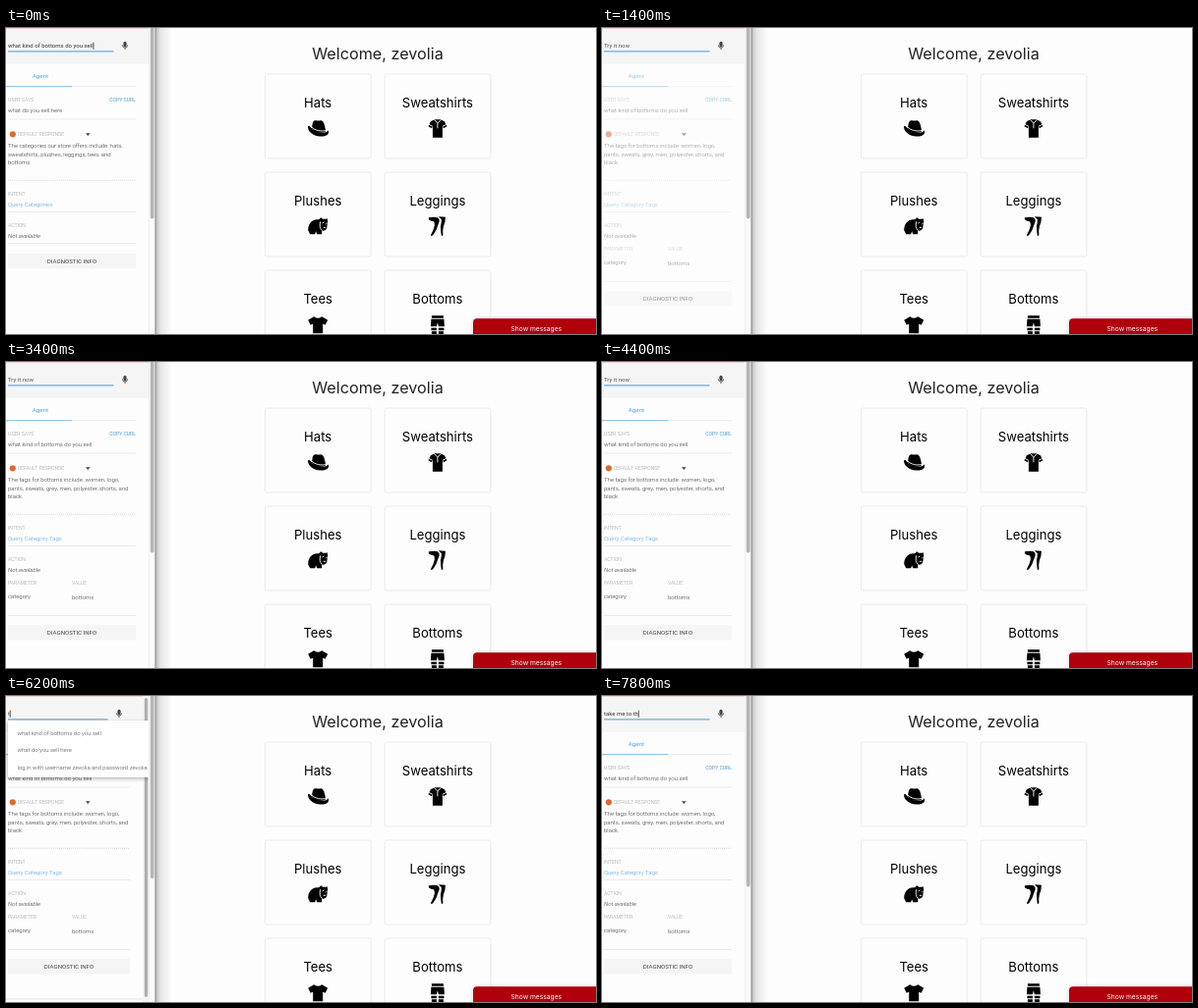
Write an HTML page that moves like this. It is 600 by 312 pixels and loops after 8 s.

```html
<!DOCTYPE html>
<html lang="en">
<head>
<meta charset="utf-8">
<title>Shop assistant</title>
<style>
  html, body { margin: 0; width: 100%; height: 100%; overflow: hidden; background: #fdfdfe; }
  svg { display: block; width: 100%; height: 100%; }
  text { white-space: pre; }
  #shop { font-family: Inter, sans-serif; text-anchor: middle; }
  #panel { font: 6px Roboto, sans-serif; fill: #555; }
  #panel .label { font-size: 5.15px; font-weight: 300; fill: #999; }
  #panel .body { font-weight: 300; fill: #333; }
  #panel .link { fill: #4a9fdc; }
</style>
</head>
<body>
<svg viewBox="0 0 600 312">
  <defs>
    <linearGradient id="edge">
      <stop offset="0" stop-color="#bbb"/>
      <stop offset=".3" stop-color="#e6e6e7"/>
      <stop offset="1" stop-color="#fdfdfe"/>
    </linearGradient>
    <filter id="blur" x="-20%" y="-40%" width="140%" height="180%"><feGaussianBlur stdDeviation="2"/></filter>
  </defs>
  <rect width="600" height="312" fill="#fdfdfe"/>
  <g id="shop"></g>
  <g id="panel"></g>
  <rect x="145" width="7" height="312" fill="#fafafa"/>
  <path d="M145.3 0V312" stroke="#e9e9e9" stroke-width=".6"/>
  <rect id="thumb" x="146.8" y="-4" width="3.7" rx="1.8" fill="#b4b4b4"/>
  <rect x="152" width="17" height="312" fill="url(#edge)"/>
  <path d="M152 0V312" stroke="#858585"/>
</svg>
<script>
const DURATION = 8000, STEP = 200;
const NAME = 'zevolia';
const QUESTION = 'what kind of bottoms do you sell';
const shop = document.getElementById('shop');
const panel = document.getElementById('panel');
const thumb = document.getElementById('thumb');

const text = (x, y, s, attrs = '') => `<text x="${x}" y="${y}" ${attrs}>${s}</text>`;
const box = (x, y, w, h, fill, attrs = '') =>
  `<rect x="${x}" y="${y}" width="${w}" height="${h}" fill="${fill}" ${attrs}/>`;
const line = (x1, x2, y, color = '#e2e2e2', attrs = '') =>
  `<path d="M${x1} ${y}H${x2}" stroke="${color}" stroke-width=".7" ${attrs}/>`;
const shape = d => `<path d="${d}"/>`;
const cut = d => `<path d="${d}" fill="none" stroke="#fdfdfe" stroke-width=".9"/>`;

// Icons are centred on the origin, about 20 units wide.
const icons = {
  Hats: shape('M-10 -2C-11 2 -6 8 3 8.300C9 8.500 12 6 10.500 2C9 5 2 6 -4 2.500C-7 0 -8 -3 -10 -2Z'
    + 'M-6 1C-6 -5 -5 -9 -2 -8Q1 -7.500 3 -8C6 -8 7 -3 8 3C4 6 -3 4 -6 1Z')
    + cut('M-6.500 -1.500C-3 2.500 4 3.500 8.500 2'),
  Sweatshirts: shape('M-3 -9L-7 -7 -9.500 -2 -6 0 -5 -2V9.500H5V-2L6 0 9.500 -2 7 -7 3 -9Z')
    + cut('M-3.500 -9L0 -5 3.500 -9M0 -5V0M-9 -4L-5 -2M9 -4L5 -2'),
  Plushes: shape('M-10 4C-10 -4 -5 -8 1 -7L3 -9 5 -7.500H8L9.500 -8 10 -5 9 2C8 4 6 5 4 4V8H-1L-2 5 -3 8H-8Z')
    + cut('M2.500 -5Q1 1 4 4M4.500 -3L6 -4.500M8 -2L9.500 -3.500M5.500 1H8'),
  Leggings: shape('M-9 -9Q-3 -10 0 -9Q3 -7 1 -3Q-1 4 -4 8L-6 10 -7 9Q-4 4 -3 -1Q-3 -4 -4 -5Q-7 -5 -9 -7Z'
    + 'M1 -10L8 -9.500Q8 -4 6 0Q5 4 5.500 9L4 10Q3 5 3 0Q4 -4 4 -7Z'),
  Tees: shape('M-4 -8Q0 -5 4 -8L10 -4.500 7.500 .5 5 -.5V9H-5V-.5L-7.500 .5 -10 -4.500Z'),
  Bottoms: shape('M-6 -9H6V-6.500H-6ZM-6.500 -5.500H6.500L7 2H1L0 -2 -1 2H-7Z'
    + 'M-6.500 3.500H-1V6H-6.500ZM1 3.500H6.500V6H1ZM-6 7H-1V10H-6ZM1 7H6V10H1Z')
};

function drawShop() {
  const cards = Object.entries(icons).map(([title, icon], i) => {
    const x = 263.5 + i % 2 * 121.7, y = 47 + Math.floor(i / 2) * 100;
    return box(x, y, 107.7, 86, '#fdfdfe', 'rx="1.8" stroke="#e6e6e6" stroke-width=".8"')
      + text(x + 53.7, y + 33.5, title, 'font-size="13.1"')
      + `<g transform="translate(${x + 53.7} ${y + 55.3})">${icon}</g>`;
  });
  shop.innerHTML = text(378, 32.3, 'Welcome, ' + NAME, 'font-size="16.2" fill="#222"')
    + cards.join('')
    + box(475, 297, 130, 20, '#0003', 'rx="4" filter="url(#blur)"')
    + box(475, 296.2, 130, 24, '#b0000c', 'rx="4"')
    + text(539.3, 308.7, 'Show messages', 'font-size="6.7" fill="#fff"');
}

const answers = [
  { says: 'what do you sell here', intent: 'Query Categories', button: 230,
    lines: ['The categories our store offers include: hats,', 'sweatshirts, plushes, leggings, tees, and', 'bottoms.'] },
  { says: QUESTION, intent: 'Query Category Tags', button: 268.3, parameter: ['category', 'bottoms'],
    lines: ['The tags for bottoms include: women, logo,', 'pants, sweats, grey, men, polyester, shorts, and', 'black.'] }
];

function drawAnswer({ says, intent, button, parameter, lines }, opacity, right) {
  const label = (x, y, s) => text(x, y, s, 'class="label"');
  const body = (x, y, s) => text(x, y, s, 'class="body"');
  return `<g opacity="${opacity}">`
    + text(right / 2 - 31.2, 51, 'Agent', 'class="link" text-anchor="middle" font-size="6.2"')
    + line(67, right, 59.7) + line(0, 67, 59.7, '#4a9fdc')
    + label(2, 75, 'USER SAYS')
    + text(right, 75, 'COPY CURL', 'class="link" text-anchor="end" font-size="5.1"')
    + body(2, 86.3, says) + line(2, right, 93)
    + '<circle cx="6.8" cy="108.3" r="3.1" fill="#dc6b2c"/>'
    + label(12, 110.3, 'DEFAULT RESPONSE')
    + '<path d="M81 107.300h4.600l-2.300 2.600z" fill="#444"/>'
    + lines.map((s, i) => body(2, 122 + i * 8.5, s)).join('')
    + line(2, right, 155.3, '#ccc', 'stroke-dasharray="1 1"')
    + label(2, 171, 'INTENT') + text(2, 182, intent, 'class="link" font-weight="300"')
    + line(2, right, 187.5)
    + label(2, 203, 'ACTION') + text(2, 213.8, 'Not available', 'class="body" font-style="italic"')
    + (parameter
      ? label(2, 227, 'PARAMETER') + label(67, 227, 'VALUE')
        + body(2, 241, parameter[0]) + body(67, 241.6, parameter[1]) + line(2, right, 258.5)
      : line(2, right, 219.5))
    + box(2, button, right - 2, 15.3, '#f5f5f5')
    + text(right / 2 + 1, button + 10, 'DIAGNOSTIC INFO', 'text-anchor="middle" font-size="6.1" fill="#444"')
    + '</g>';
}

function drawInput(typed, caret, waiting, right) {
  const x = right - 11;
  return box(0, 0, 146, 36, '#f6f5f6') + box(0, 0, 146, .8, '#f7cfc9')
    + line(0, 146, 36, '#efefef')
    + `<text id="entry" x="2" y="20.200" fill="${typed ? '#333' : waiting ? '#888' : '#555'}">${typed || 'Try it now'}</text>`
    + line(2, right - 22.5, 23.9, waiting ? '#6bb2e4' : '#3f9bdc', 'style="stroke-width:1"')
    + `<path id="caret" d="M0 14.500V22" stroke="#222" stroke-width=".7" opacity="${caret}"/>`
    + box(x - 1.6, 13.8, 3.2, 5.4, '#444', 'rx="1.6"')
    + `<path d="M${x - 2.7} 17.300a2.700 2.700 0 0 0 5.400 0M${x} 20v2.200" fill="none" stroke="#444" stroke-width=".8"/>`;
}

function drawMenu() {
  const items = [QUESTION, 'what do you sell here', `log in with username ${NAME} and password ${NAME}`];
  return box(139.3, 0, 6, 312, '#f3f3f3') + box(140.8, 2, 3.4, 305, '#b0b0b0', 'rx="1.700"')
    + line(0, 139, 309, '#d8d8d8')
    + box(2, 27, 143, 57, '#0005', 'filter="url(#blur)"')
    + box(2, 25, 143.5, 58, '#fefefe')
    + items.map((s, i) => text(11.5, 40 + i * 17.3, s, 'fill="#444" font-weight="300"')).join('');
}

// Typed text by start time; an empty string shows the placeholder.
const typing = [[0, QUESTION], [200, ''], [6000, 't'], [6400, 'ta'], [6600, 'tak'], [6800, 'take '],
  [7000, 'take m'], [7200, 'take me '], [7400, 'take me t'], [7600, 'take me to'], [7800, 'take me to th']];
const clamp = v => Math.max(0, Math.min(1, v));

function drawPanel(t) {
  const typed = typing.filter(([start]) => start <= t).pop()[1];
  const blink = [1, 1, .5, 0, 0][(t + 200) % 1000 / STEP];
  const menuOpen = t >= 6000 && t < 6400;
  const right = menuOpen ? 126 : 132;
  const leaving = clamp((600 - t) / 500), entering = clamp((t - 1100) / 550);
  panel.innerHTML = box(0, 0, 146, 312, '#fdfdfd')
    + (leaving ? drawAnswer(answers[0], leaving, right) : '')
    + (entering ? drawAnswer(answers[1], entering, right) : '')
    + drawInput(typed, typed ? 1 : blink, t >= 200 && t < 1200, right)
    + (menuOpen ? drawMenu() : '');
  thumb.setAttribute('height', menuOpen ? 190 : 198.5);
  const width = typed ? document.getElementById('entry').getComputedTextLength() : 0;
  document.getElementById('caret').setAttribute('transform', `translate(${2.3 + width})`);
}

let shown = -1;
function tick() {
  const t = Math.floor(performance.now() % DURATION / STEP) * STEP;
  if (t !== shown) drawPanel(shown = t);
  requestAnimationFrame(tick);
}
drawShop();
tick();
</script>
</body>
</html>
```
